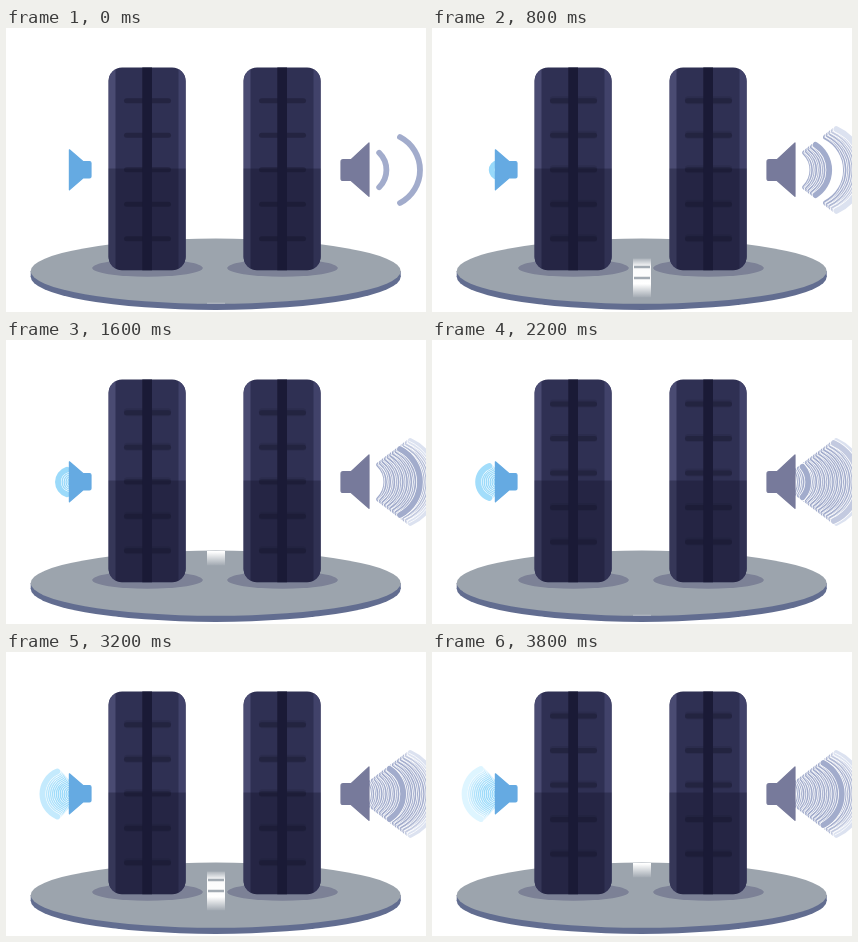
These frames come from a looping animation (420x284 px, 4 s). An HTML page:

```html
<!DOCTYPE html>
<html lang="en">
<head>
<meta charset="utf-8">
<title>Tyre noise</title>
<style>
  html, body { margin: 0; width: 100%; height: 100%; overflow: hidden; background: #fff; }
  svg { display: block; width: 420px; height: 284px; }
</style>
</head>
<body>
<svg viewBox="0 0 420 284">
  <defs>
    <linearGradient id="fade" x1="0" y1="0" x2="0" y2="1">
      <stop offset="0" stop-color="#fff" stop-opacity="0.15"/>
      <stop offset="0.2" stop-color="#fff" stop-opacity="0.95"/>
      <stop offset="0.65" stop-color="#fff"/>
      <stop offset="1" stop-color="#fff" stop-opacity="0.05"/>
    </linearGradient>
    <clipPath id="tyreShape"><rect x="102.600" y="39.500" width="77" height="202.800" rx="13.500"/></clipPath>
    <clipPath id="road"><rect x="195" y="211" width="30" height="65"/></clipPath>
    <g id="tyre" clip-path="url(#tyreShape)">
      <rect x="102" y="39" width="78" height="204" fill="#2f3053"/>
      <rect x="102" y="39" width="7.500" height="204" fill="#4a4b72"/>
      <rect x="172.500" y="39" width="8" height="204" fill="#41426a"/>
      <g id="treads"></g>
      <rect x="102" y="140.500" width="78" height="103" fill="#12122a" opacity="0.35"/>
      <rect x="136.300" y="39" width="9.700" height="204" fill="#1a1a36"/>
    </g>
  </defs>

  <ellipse cx="209.700" cy="248.700" rx="185" ry="33.200" fill="#626d90"/>
  <rect x="24.700" y="243" width="370" height="6" fill="#626d90"/>
  <ellipse cx="209.700" cy="243.200" rx="185" ry="32.600" fill="#9ca4ad"/>
  <g clip-path="url(#road)"><g id="dash">
    <rect x="201" width="18" height="39" fill="url(#fade)"/>
    <path d="M202 8.500H218M202 19.500H218" stroke="#a3abb3" stroke-width="2.600"/>
  </g></g>
  <ellipse cx="141.500" cy="240" rx="55.300" ry="8.700" fill="#7c8196"/>
  <ellipse cx="276.500" cy="240" rx="55.300" ry="8.700" fill="#7c8196"/>

  <use href="#tyre"/>
  <use href="#tyre" x="135"/>

  <g id="waves" fill="none" stroke-linecap="round"></g>
  <path d="M63.400 121.800L77 133.500H83.500Q85 133.500 85 135V148.500Q85 150 83.500 150H77L63.400 161.800Z"
        fill="#65aae2" stroke="#65aae2" stroke-width="1.200" stroke-linejoin="round"/>
  <path d="M363 114.900L345 131.700H337Q335 131.700 335 133.700V150.500Q335 152.500 337 152.500H345L363 168.300Z"
        fill="#777a9b" stroke="#777a9b" stroke-width="1.200" stroke-linejoin="round"/>
</svg>
<script>
const LOOP = 4000, STEP = 200, MID_Y = 142;
const get = id => document.getElementById(id);
const rgb = (from, to, p) => `rgb(${from.map((v, i) => v + (to[i] - v) * p)})`;

// Arc through its apex, bulging towards dir.
function arcPath(apex, half, sag, dir) {
  const r = (sag * sag + half * half) / (2 * sag);
  const x = apex - dir * sag;
  return `M${x} ${MID_Y - half}A${r} ${r} 0 ${sag > r ? 1 : 0} ${dir > 0 ? 1 : 0} ${x} ${MID_Y + half}`;
}

const stroke = (d, color, width) => `<path d="${d}" stroke="${color}" stroke-width="${width}"/>`;

function loudWave(age, isPast) {
  const d = age * 0.021, half = 33 + 0.47 * d, sag = 20 + 0.38 * d;
  if (age > 800 || half < 3 || sag < 1) return '';
  const color = rgb([162, 172, 204], [220, 226, 240], Math.max(0, age / 800) ** 2);
  const path = arcPath(414 + d, half, sag, 1);
  const crease = isPast ? stroke(arcPath(412.6 + d, half, sag, 1), '#fff', 0.8) : '';
  return stroke(path, '#fff', 7.4) + stroke(path, color, 5.8) + crease;
}

function quietWave(t) {
  if (t < 300 || t > 3600) return '';
  const color = rgb([152, 217, 250], [222, 245, 255], (t / 3600) ** 4);
  const path = arcPath(67.5 - 0.0097 * t, 2 + 0.0064 * t, 3 + 0.0037 * t, -1);
  return stroke(path, '#fff', 7) + stroke(path, color, 5.9);
}

// Each step leaves its arcs behind until the loop restarts.
function waves(t) {
  let out = '';
  for (let s = 0; s <= t; s += STEP) {
    const ages = [s, s - 1600, s - LOOP];
    out += ages.map(age => loudWave(age, s < t)).join('') + quietWave(s);
  }
  return out;
}

function treads(t) {
  const shift = (t % 800) / 800 * 34.5;
  let out = '';
  for (let k = -1; k < 5; k++) {
    const y = 72.7 + 34.5 * k + shift;
    if (y < 41 || y > 232) continue;
    if (t > 0) out += `<rect x="118" y="${y - 4.5}" width="47" height="8" rx="3" fill="#23233f" opacity="0.25"/>`;
    out += `<rect x="118" y="${y - 2.5}" width="47" height="5" rx="2.500" fill="#23233f" opacity="0.85"/>`;
  }
  return out;
}

let shown = -1;
function draw(t) {
  if (t === shown) return;
  shown = t;
  get('treads').innerHTML = treads(t);
  get('waves').innerHTML = waves(t);
  get('dash').setAttribute('transform', `translate(0 ${274.5 - (t % 2200) * 0.055})`);
}

const start = performance.now();
function tick() {
  const t = (performance.now() - start) % LOOP;
  draw(Math.floor(t / STEP) * STEP);
  requestAnimationFrame(tick);
}
draw(0);
requestAnimationFrame(tick);
</script>
</body>
</html>
```
